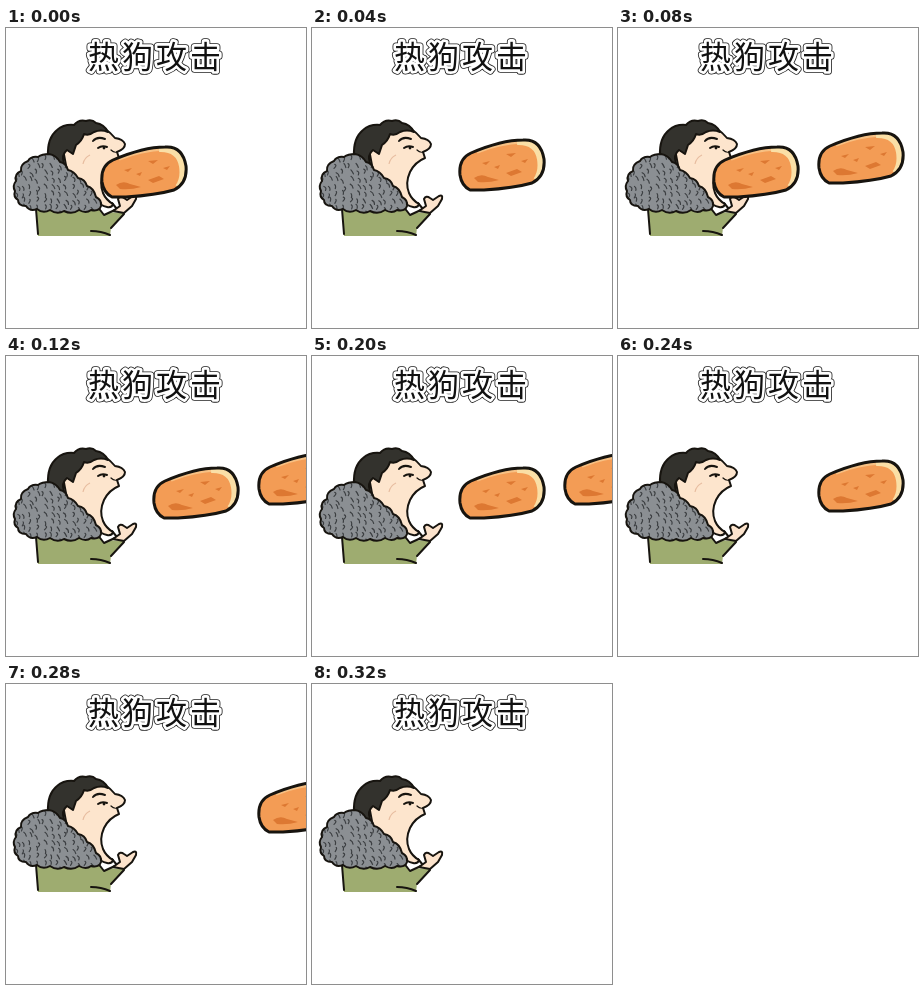
These frames come from a looping animation (300x300 px, 0.36 s). An HTML page:

```html
<!DOCTYPE html>
<html lang="zh-CN">
<head>
<meta charset="utf-8">
<title>热狗攻击</title>
<style>
html, body { margin: 0; width: 100%; height: 100%; overflow: hidden; background: #fff; }
svg { display: block; width: 100vw; height: 100vh; }
.ink { stroke: #17140f; stroke-width: 2; stroke-linecap: round; stroke-linejoin: round; }
.line { fill: none; }
.title { font: 400 31px "Noto Sans CJK SC", "Noto Sans CJK", sans-serif; letter-spacing: 3px; stroke-linejoin: round; }
.bun { visibility: hidden; animation: fly 360ms step-end infinite; }
.second { animation-delay: -280ms; }
.third { animation-delay: -200ms; }
@keyframes fly {
  0% { visibility: visible; transform: translate(-105px, 14px); }
  11.11% { visibility: visible; transform: translate(-53px, 7px); }
  22.22% { visibility: visible; transform: none; }
  33.33% { visibility: visible; transform: translate(52px, -7px); }
  44.44%, 100% { visibility: hidden; transform: none; }
}
</style>
</head>
<body>
<svg viewBox="0 0 300 300">
  <defs>
    <path id="loaf" d="M201 140C200 130 203 122 212 118C226 112 246 105 264 105C277 104 283 112 285 124C286 135 283 143 273 148C259 152 241 154 225 155L211 155C205 152 202 147 201 140Z"/>
    <path id="fur" d="M43 126Q36 126 32 129Q25 128 22 133Q14 136 15 143Q8 146 10 153Q6 158 9 163Q7 169 12 172Q12 178 20 178Q24 184 31 181Q37 186 44 182Q51 187 58 183Q66 187 73 182Q80 186 85 182Q93 184 95 178Q96 172 90 169Q88 160 81 158Q79 151 72 150Q68 143 62 142Q60 135 54 134Q50 127 43 126Z"/>
    <clipPath id="loafClip"><use href="#loaf"/></clipPath>
    <clipPath id="furClip"><use href="#fur"/></clipPath>
    <g id="bun">
      <use href="#loaf" fill="#f39c55"/>
      <g clip-path="url(#loafClip)">
        <path d="M218 117Q240 108 264 107" fill="none" stroke="#f7c184" stroke-width="3"/>
        <path d="M258 107Q278 106 281 124Q283 137 277 145" fill="none" stroke="#fadfa6" stroke-width="6"/>
        <g fill="#dd7832">
          <path d="M215 143Q222 138 229 142L240 145Q230 148 219 147Z"/>
          <path d="M247 138L258 134L263 137L252 141Z"/>
          <path d="M223 128L231 126L227 130Z"/>
          <path d="M247 119L257 118L252 122Z"/>
          <path d="M235 132L241 130L239 134Z"/>
          <path d="M262 126L269 124L266 128Z"/>
        </g>
      </g>
      <use href="#loaf" class="ink line" stroke-width="3" style="stroke-width: 3px"/>
    </g>
  </defs>

  <g class="title">
    <text x="82" y="39.5" fill="#222" stroke="#222" stroke-width="7">热狗攻击</text>
    <text x="82" y="39.5" fill="#fff" stroke="#fff" stroke-width="5.4">热狗攻击</text>
    <text x="82" y="39.5" fill="#111">热狗攻击</text>
  </g>

  <!-- jacket, shirt and hand -->
  <path d="M30 178L32 208L104 208L105 200L119 185L101 184L88 176Z" fill="#9eac70"/>
  <path class="ink line" d="M30 181L32 206M85 203Q95 203 104 207M105 200L118 186"/>
  <path class="ink" d="M91 178L98 187L111 181L106 175Z" fill="#fff" stroke-width="1.2"/>
  <path class="ink" d="M107 183L114 178L112 171Q114 167 118 170L121 172L127 168Q131 166 130 171L126 178L118 185Z" fill="#fce3cc"/>

  <!-- head -->
  <path class="ink" d="M56 116L70 100L98 100Q105 105 109 110Q117 111 119 116Q119 121 111 124L113 130Q103 134 98 144Q93 155 97 165Q100 172 107 176Q106 180 101 179Q95 178 88 171L62 148Z" fill="#fde5cd"/>
  <path d="M42 128Q41 110 51 102Q58 96 68 97Q73 91 80 93Q86 91 90 95Q98 96 102 104Q95 101 88 104Q83 108 78 106Q76 113 70 117L67 126L61 122Q55 127 58 135L60 142Q49 139 42 128Z" class="ink" fill="#33322d"/>
  <path class="ink line" d="M87 113Q91 108 99 111"/>
  <path class="ink line" d="M92 120Q96 117 101 119"/>
  <circle cx="98" cy="120" r="1.4" fill="#17140f"/>
  <path class="ink line" d="M105 122Q108 125 111 124" style="stroke-width: 1.2px"/>
  <path d="M84 127Q78 130 77 136" fill="none" stroke="#e7bda0" stroke-width="1.2"/>

  <use href="#fur" fill="#8b8f93"/>
  <path id="hairs" clip-path="url(#furClip)" fill="none" stroke="#3c3f42" stroke-width="1.2" stroke-linecap="round"/>
  <use href="#fur" class="ink line"/>

  <use href="#bun" class="bun third"/>
  <use href="#bun" class="bun second"/>
  <use href="#bun" class="bun"/>
</svg>
<script>
let seed = 19;
const random = () => (seed = seed * 16807 % 2147483647) / 2147483647;

let strokes = '';
for (let y = 127; y < 186; y += 7) {
  for (let x = 8; x < 98; x += 7) {
    const left = x + random() * 4;
    const top = y + random() * 4;
    strokes += `M${left} ${top}q${1 + random() * 2} 1 ${random() * 4 - 1} 4`;
  }
}
document.getElementById('hairs').setAttribute('d', strokes);
</script>
</body>
</html>
```
